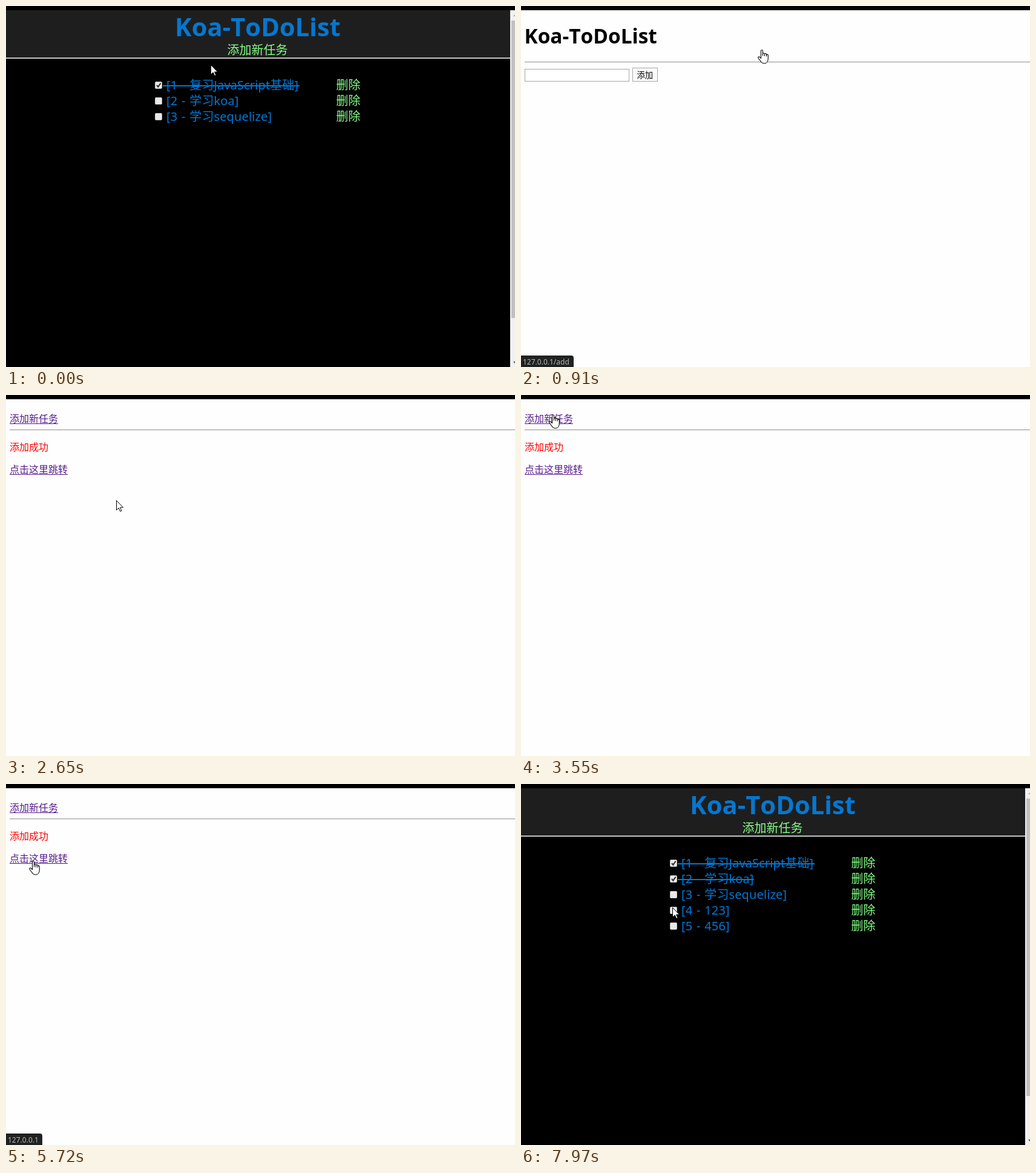
An HTML page for the animation above (8000 ms loop, 841 by 597 pixels).

```html
<!DOCTYPE html>
<html lang="zh-CN">
<head>
<meta charset="utf-8">
<title>Koa-ToDoList</title>
<style>
  html, body { margin: 0; width: 100%; height: 100%; overflow: hidden; background: #000; }
  svg { display: block; width: 841px; height: 597px; }
  text { font-family: "Noto Sans", "Noto Sans CJK SC", sans-serif; font-kerning: none; white-space: pre; }
  .title { font-weight: 700; }
  .row { word-spacing: 1.4px; letter-spacing: .12px; }
</style>
</head>
<body>
<svg id="stage" viewBox="0 0 841 597" xmlns="http://www.w3.org/2000/svg"></svg>
<script>
const LOOP = 8000;
const BLUE = '#0078d7', GREEN = '#85ff88', PURPLE = '#551a8b';

// Step tables: [start ms, value]
const PAGES = [[0, 'list'], [910, 'add'], [2480, 'done'], [3850, 'add'], [5150, 'done'], [5850, 'list']];
const STATUS = [[0, ''], [400, '127.0.0.1/add'], [1060, ''], [3700, '127.0.0.1/add'], [3960, ''],
  [5690, '127.0.0.1'], [5970, '']];
const FOCUS = [[0, false], [1400, true], [2480, false], [4150, true], [5150, false]];
const TYPED = [[0, ''], [1830, '1'], [1950, '12'], [2100, '123'], [3850, ''], [4490, '4'], [4550, '45'], [4700, '456']];
const HISTORY = ['123', '111', '1', '3333', '学习Java', '222'];
const HINTS = [[0, []], [1460, HISTORY], [1830, HISTORY.slice(0, 3)], [1950, ['123']], [2100, []],
  [4200, HISTORY], [4490, ['4444']], [4550, []]];
const ROWS = [[0, 3], [5850, 5]];
const KOA_DONE = [[0, false], [7180, true]];

// Pointer path: [ms, x, y]
const PATH = [[0, 338, 97], [510, 397, 72], [940, 397, 72], [1380, 100, 114], [1460, 100, 114], [1710, 184, 131],
  [1900, 190, 131], [2270, 205, 111], [2500, 205, 111], [2840, 150, 262], [3210, 83, 136], [3550, 52, 32],
  [3880, 52, 32], [4130, 95, 114], [4200, 95, 114], [4460, 173, 126], [4640, 173, 126], [4950, 205, 111],
  [5180, 205, 111], [5330, 150, 128], [5390, 150, 128], [5640, 44, 127], [5880, 44, 127], [6180, 319, 295],
  [7010, 251, 161], [7040, 250, 160], [7230, 250, 160], [7400, 250, 182], [7830, 250, 182], [7970, 250, 204]];

const rect = (x, y, w, h, fill, more = '') => `<rect x="${x}" y="${y}" width="${w}" height="${h}" fill="${fill}" ${more}/>`;
const text = (x, y, size, fill, body, more = '') =>
  `<text x="${x}" y="${y}" font-size="${size}" fill="${fill}" ${more}>${body}</text>`;
const group = (id, body) => `<g id="${id}">${body}</g>`;
const rule = (x, y, w) => rect(x, y, w, 1, '#9a9a9a') + rect(x, y + 1, w, 1, '#eee');
const link = (y, body) => text(6, y, 16, PURPLE, body) + rect(6, y + 2, body.length * 16, 1, PURPLE);
const tick = y => `<path d="M249 ${y + 6}l2.4 2.7 4.2-6.2" fill="none" stroke="#333" stroke-width="2.1"/>`;

function task(i, body, strikeEnd) {
  const y = 125 + 26 * i;
  const strike = strikeEnd ? group('strike' + i, rect(259, y + 6, strikeEnd - 259, 2, BLUE) + tick(y)) : '';
  return group('row' + i,
    rect(246.5, y + .5, 11, 11, '#e9e9e9', 'rx="1.5" stroke="#bdbdbd"') +
    text(265, y + 13, 20, BLUE, `[${i + 1} - ${body}]`, 'class="row"') +
    text(545.5, y + 13, 20, GREEN, '删除') + strike);
}

const listPage = rect(0, 7, 833, 79, '#1e1e1e') + rule(0, 85, 833) +
  text(416, 49.5, 41.7, '#0577d0', 'Koa-ToDoList', 'class="title" text-anchor="middle"') +
  text(365.5, 80, 20, GREEN, '添加新任务') +
  task(0, '复习JavaScript基础', 485) + task(1, '学习koa', 385) +
  task(2, '学习sequelize') + task(3, '123') + task(4, '456') +
  rect(833, 7, 8, 590, '#f1f1f1') + rect(835, 24, 6, 492, '#c1c1c1') +
  '<path d="M838 17l3-3v3z" fill="#a3a3a3"/><path d="M838 588h3v3z" fill="#404040"/>';

const addPage = rect(0, 7, 841, 590, '#fefefe') +
  text(5.5, 62, 33.4, '#000', 'Koa-ToDoList', 'class="title"') + rule(6, 92, 835) +
  rect(6.5, 104.5, 172, 20, '#fff', 'stroke="#a6a6a6"') +
  group('glow', rect(5.5, 103.5, 174, 22, 'none', 'rx="1" stroke="#9dbcec"') +
    rect(6.5, 104.5, 172, 20, 'none', 'stroke="#5b8bd6"')) +
  text(8, 119, 13.33, '#000', '', 'id="typed"') + rect(8, 107, 1, 15, '#000', 'id="caret"') +
  rect(184.5, 102.5, 41, 22, '#fdfdfd', 'id="button" stroke="#a6a6a6"') + text(191.5, 119, 13.33, '#000', '添加') +
  group('hints', rect(6, 126, 192, 52, '#fff', 'id="panel" rx="3" filter="url(#shadow)"') +
    HISTORY.map((_, i) => text(18, 156 + 36 * i, 13.33, '#222', '', 'class="hint"')).join(''));

const donePage = rect(0, 7, 841, 590, '#fefefe') + link(45, '添加新任务') + rule(6, 57, 835) +
  text(6, 92, 16, '#f00', '添加成功') + link(129, '点击这里跳转');

const outline = 'fill="#fff" stroke="#000" stroke-linejoin="round"';
const pointers =
  group('arrow', `<path ${outline} d="M.5 .5V16.3L4.2 12.8 6.7 18.5 9 17.5 6.6 12H11.6Z"/>`) +
  group('hand', `<path ${outline} stroke-width="1.1" d="M-.5 14.5V2.2a1.5 1.5 0 0 1 3 0V10V7.5a1.5 1.5 0 0 1 3 0V10.5V8a1.5 1.5 0 0 1 3 0V11V9.5a1.4 1.4 0 0 1 2.8 0V15c0 4-2 8-6.5 8-4 0-5-2-6.5-4.5L-5 14c-.9-1.4 1-2.8 2.2-1.6Z"/>`) +
  group('beam', '<path d="M-3 -8.5h2.5l.5 .5 .5-.5H3M0 -8V7M-3 7.5h2.5l.5-.5 .5 .5H3" fill="none" stroke="#000"/>');

const $ = id => document.getElementById(id);
$('stage').innerHTML = `<defs>
    <linearGradient id="face" x2="0" y2="1"><stop stop-color="#fafafa"/><stop offset="1" stop-color="#e9e9e9"/></linearGradient>
    <filter id="shadow" x="-10%" y="-10%" width="120%" height="130%">
      <feDropShadow dx="0" dy="1" stdDeviation="1.2" flood-opacity=".4"/></filter>
  </defs>` + rect(0, 0, 841, 597, '#000') +
  group('list', listPage) + group('add', addPage) + group('done', donePage) + rect(0, 0, 841, 7, '#000') +
  group('status', '<path id="bubble" fill="#202221"/>' + text(3, 593, 12, '#b4b6b5', '', 'id="address"')) +
  group('pointer', pointers);

const hintLines = [...document.querySelectorAll('.hint')];
const show = (id, on) => $(id).setAttribute('visibility', on ? 'inherit' : 'hidden');
const at = (steps, t) => steps.findLast(s => s[0] <= t)[1];

function position(t) {
  const i = PATH.findLastIndex(p => p[0] <= t);
  const [t0, x0, y0] = PATH[i];
  const [t1, x1, y1] = PATH[i + 1] || [LOOP, x0, y0];
  const u = (t - t0) / (t1 - t0), e = u * u * (3 - 2 * u);
  return [Math.round(x0 + (x1 - x0) * e), Math.round(y0 + (y1 - y0) * e)];
}

function pointerKind(page, x, y, t) {
  const inside = (l, top, r, b) => x >= l && x <= r && y >= top && y <= b;
  // The hand stays for a moment after a link opens a new page.
  if ([910, 3850, 5850].some(click => t >= click && t < click + 55)) return 'hand';
  if (page === 'list') return inside(365, 62, 466, 84) ? 'hand' : 'arrow';
  if (page === 'add') return inside(6, 104, 179, 125) ? 'beam' : 'arrow';
  return inside(6, 30, 86, 48) || inside(6, 114, 102, 132) ? 'hand' : 'arrow';
}

function render(t) {
  const page = at(PAGES, t), focus = at(FOCUS, t), typed = at(TYPED, t);
  const hints = at(HINTS, t), status = at(STATUS, t);
  for (const id of ['list', 'add', 'done']) $(id).style.display = id === page ? '' : 'none';

  for (const i of [3, 4]) show('row' + i, i < at(ROWS, t));
  show('strike1', at(KOA_DONE, t));

  $('button').setAttribute('fill', focus ? 'url(#face)' : '#fdfdfd');
  show('glow', focus);
  show('caret', focus);
  $('typed').textContent = typed;
  $('caret').setAttribute('x', 8 + Math.round(typed.length * 7.3));
  show('hints', hints.length);
  $('panel').setAttribute('height', 16 + 36 * hints.length);
  hintLines.forEach((line, i) => line.textContent = hints[i] || '');

  show('status', status);
  $('address').textContent = status;
  $('bubble').setAttribute('d', `M0 578H${status.length > 9 ? 83 : 56}q4 0 4 4V597H0Z`);

  const [x, y] = position(t), kind = pointerKind(page, x, y, t);
  $('pointer').setAttribute('transform', `translate(${x} ${y})`);
  for (const id of ['arrow', 'hand', 'beam']) show(id, id === kind);
}

const start = performance.now();
function frame() {
  render((performance.now() - start) % LOOP);
  requestAnimationFrame(frame);
}
frame();
</script>
</body>
</html>
```
